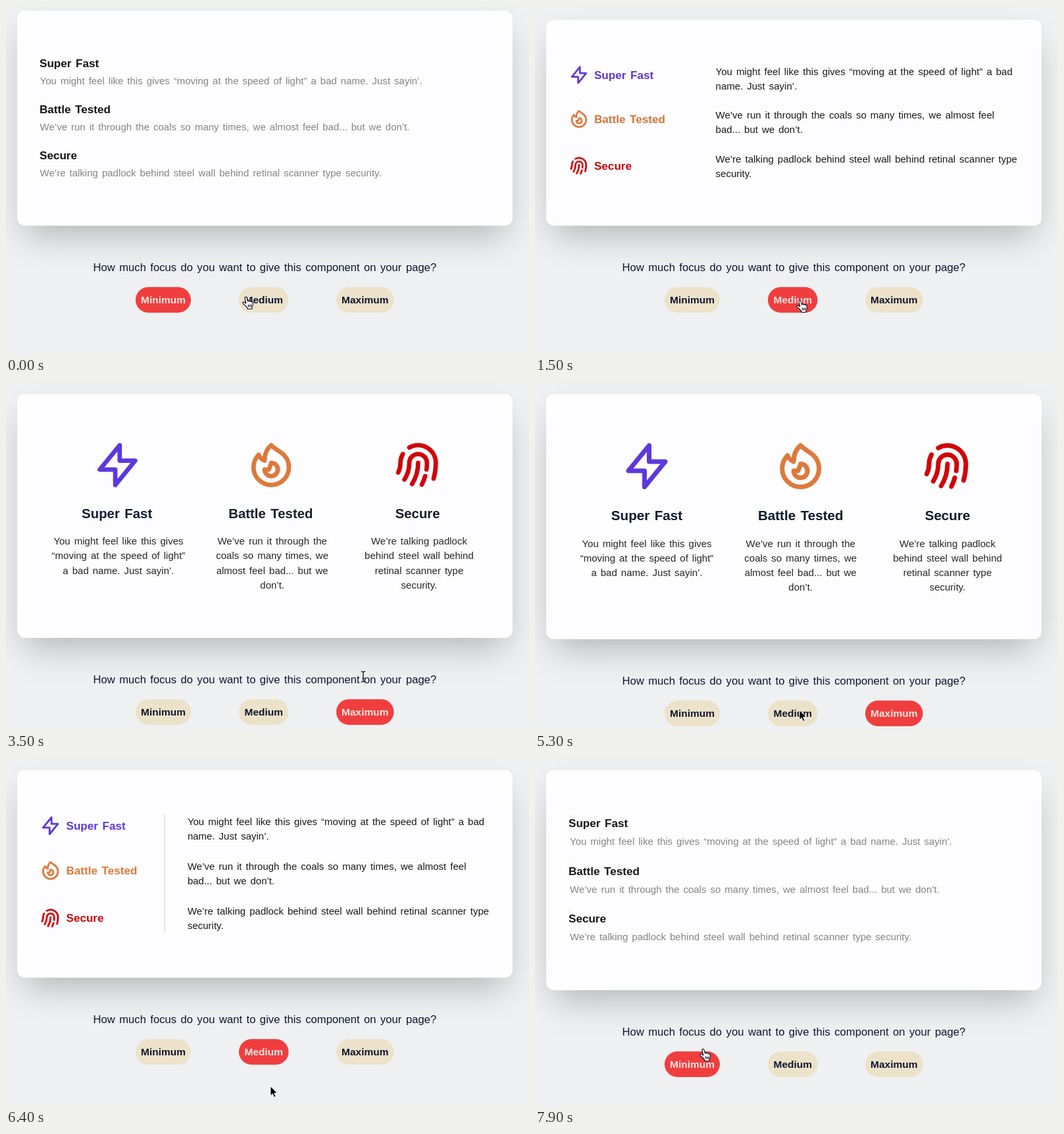
Write an HTML page that moves like this. It is 795 px wide and 529 px high and loops after 8 s.

```html
<!DOCTYPE html>
<html lang="en">
<head>
<meta charset="utf-8">
<title>Component focus</title>
<style>
  html, body { margin: 0; width: 100%; height: 100%; overflow: hidden; background: #eef0f1; }
  #card {
    position: absolute; left: 17px; width: 752.5px; border-radius: 12px;
    background: #fdfcfe; box-shadow: 0 25px 50px -12px rgba(0, 4, 0, .26);
  }
  svg { position: absolute; left: 0; top: 0; }
  text { font: 15px "Liberation Sans", Arial, sans-serif; word-spacing: 1.85px; white-space: pre; }
  .title { font-weight: bold; }
  .icon { fill: none; stroke-width: 2; stroke-linecap: round; stroke-linejoin: round; }
  .question { font-size: 16.65px; fill: #0f1632; }
  .label { font-size: 15.5px; font-weight: bold; }
  .mid { text-anchor: middle; }
</style>
</head>
<body>
<div id="card"></div>
<svg id="stage" width="795" height="529">
  <path id="rule" stroke="#c3d5d9" fill="none"/>
  <g id="controls"><text class="question mid" x="393.3" y="403">How much focus do you want to give this component on your page?</text></g>
  <circle id="ring" r="32.5" fill="none" stroke="#0c0c18" stroke-width="1.5"/>
  <path id="cursor" stroke-linejoin="round"/>
</svg>
<script>
const LOOP = 8000, MORPH = 400;
const MIN = 0, MED = 1, MAX = 2;
const $ = id => document.getElementById(id);

// In copy, "|" breaks a line in the medium layout and "/" in the maximum one.
const items = [
  { name: 'Super Fast', color: '#5d38dc',
    copy: 'You might feel like this gives /“moving at the speed of light” /a bad |name. Just sayin’.',
    icon: 'M13 10V3L4 14h7v7l9-11h-7z' },
  { name: 'Battle Tested', color: '#de793c',
    copy: 'We’ve run it through the /coals so many times, we /almost feel |bad... but we /don’t.',
    icon: 'M17.657 18.657A8 8 0 0 1 6.343 7.343S7 9 9 10c0-2 .5-5 2.986-7C14 5 16.09 5.777 17.656 7.343A7.975 7.975 0 0 1 20 13a7.975 7.975 0 0 1-2.343 5.657zM9.879 16.121A3 3 0 1 0 12.015 11L11 14H9c0 .768.293 1.536.879 2.121z' },
  { name: 'Secure', color: '#d00409',
    copy: 'We’re talking padlock /behind steel wall behind /retinal scanner type |/security.',
    icon: 'M12 11c0 3.517-1.009 6.799-2.753 9.571m-3.44-2.04l.054-.09A13.916 13.916 0 0 0 8 11a4 4 0 1 1 8 0c0 1.017-.07 2.019-.203 3m-2.118 6.844A21.88 21.88 0 0 0 15.171 17m3.839 1.132c.645-2.266.99-4.659.99-7.132A8 8 0 0 0 8 4.07M3 15.364c.64-1.319 1-2.8 1-4.364 0-1.457.39-2.823 1.07-4' }
];
const buttons = [['Minimum', 197, 84], ['Medium', 354, 75.5], ['Maximum', 502, 87.5]];

const scenes = [
  { at: -LOOP, mode: MIN, from: MIN, top: () => 7 },
  { at: 1205, mode: MED, from: MIN, top: h => 334 - h },
  { at: 3225, mode: MAX, from: MED, top: () => 18 },
  { at: 5420, mode: MED, from: MAX, top: () => 18 },
  { at: 7600, mode: MIN, from: MED, top: () => 18 }
];
const clicks = [[1000, 1230], [3000, 3230], [5330, 5480], [7430, 7610]];

// Pointer moves: start, end, x, y
const moves = [[0, 0, 364, 443], [150, 650, 402, 448], [2250, 2850, 543, 448],
  [4150, 4950, 402, 499], [6750, 7300, 255, 443]];
const pointerTypes = [[0, 'hand'], [2450, 'arrow'], [2680, 'hand'], [3300, 'beam'], [4250, 'arrow'], [7080, 'hand']];
const pointers = {
  hand: { fill: '#fff', stroke: '#14142a', width: 1.2,
    d: 'M-1 1.2C-1.4-.8 1.2-1.4 2 .6L3.6 6C4 4.8 6 4.8 6.4 6.2 7 5.2 8.8 5.4 9 6.8 9.8 6 11.4 6.6 11.4 8.2 11.6 11.4 11 13 10 15V17.5H3.2L2.6 15.5C1 13.6-.6 11.6-3.6 9.4-5 8-3.6 6.4-2 7.2L.8 9ZM4.4 10.8V14.4M6.5 10.8V14.4M8.6 10.8V14.4' },
  arrow: { fill: '#000', stroke: '#fff', width: .9, d: 'M0 0V14.5L3.3 11.4 5.6 16.8 8 15.8 5.7 10.5H10.3Z' },
  beam: { fill: 'none', stroke: '#111', width: 1.3,
    d: 'M-3.2-8Q-.6-8 0-6.4.6-8 3.2-8M0-6.4V6.4M-3.2 8Q-.6 8 0 6.4.6 8 3.2 8M-1.6 2.5H1.6' }
};

// Card heights and item places; r is the share of the morph still to go.
const heights = [
  r => 327 + 190 * r,
  (r, from) => 316 + r * (from === MAX ? 100 : -62),
  r => 373 - 32 * r
];
const poses = [
  (i, r) => {
    const y = 86 + 70 * i + (34 + 62 * i) * r;
    return { size: 34 * r, icon: [52 + 17 * r, 68 + (70 + 62 * r) * i + 17 * r],
      title: [51, y], font: 17.1, copy: [51.6 + 35 * r, y + 26 + 28 * r] };
  },
  (i, r, from) => {
    const big = from === MAX, grow = (big ? 50 : -34) * r;
    const y = 85 + [0, 68, 140.5][i] + r * (big ? 25 + 40 * i : -20 - 26 * i);
    return { size: 34 + grow, icon: [67.7 + grow / 2, y], title: [91.5 + grow, y + 5.8],
      font: 17.1 + (big ? 3.5 * r : 0),
      copy: [275.9 - 30 * r, 84.3 + i * (67.6 + r * (big ? 40 : -31))] };
  },
  (i, r) => {
    const x = [170, 403.7, 627][i], size = 84 - 50 * r;
    return { size, icon: [x - 8 * r, 68 + size / 2], title: [x - 20 * r, 192.2 - 54 * r],
      font: 20.6 - 3.5 * r, copy: [x + 14 * r, 232.5 - 48 * r] };
  }
];
const titleColor = (mode, item) => ['#141315', item.color, '#0c1a2a'][mode];
const copyColor = ['#858387', '#19181b', '#262528'];
const mix = (from, to, r) => `color-mix(in srgb, ${from} ${r * 100}%, ${to})`;

function add(parent, tag, attrs, content = '') {
  const el = document.createElementNS('http://www.w3.org/2000/svg', tag);
  set(el, attrs);
  el.textContent = content;
  return parent.appendChild(el);
}
function set(el, attrs) {
  for (const key in attrs) el.setAttribute(key, attrs[key]);
}
const place = (el, [x, y], top = 0) => el.setAttribute('transform', `translate(${x} ${y + top})`);

function splitCopy(copy, mode) {
  if (mode === MIN) return [copy.replace(/[|/]/g, '')];
  return mode === MED ? copy.replace(/\//g, '').split('|') : copy.replace(/\|/g, '').split('/');
}

for (const item of items) {
  const group = add($('stage'), 'g', {});
  $('stage').insertBefore(group, $('controls'));
  item.iconEl = add(group, 'path', { class: 'icon', d: item.icon, stroke: item.color });
  item.titleEl = add(group, 'text', { class: 'title' }, item.name);
  item.copyEls = [MIN, MED, MAX].map(mode => {
    const text = add(group, 'text', mode === MAX ? { class: 'mid' } : {});
    text.style.fill = copyColor[mode];
    splitCopy(item.copy, mode).forEach((line, n) => add(text, 'tspan', { x: 0, y: n * 22.2 }, line.trim()));
    return text;
  });
}
const buttonEls = buttons.map(([name, x, width]) => [
  add($('controls'), 'rect', { x, y: 427.3, width, height: 39, rx: 19.5 }),
  add($('controls'), 'text', { class: 'label mid', x: x + width / 2, y: 452 }, name)
]);

function drawPointer(t) {
  let x = 0, y = 0;
  for (const [start, end, toX, toY] of moves) {
    if (t < start) break;
    const p = end > start ? Math.min(1, (t - start) / (end - start)) : 1;
    const e = p * p * (3 - 2 * p);
    x += (toX - x) * e;
    y += (toY - y) * e;
  }
  const look = pointers[pointerTypes.findLast(([at]) => t >= at)[1]];
  set($('cursor'), { d: look.d, fill: look.fill, stroke: look.stroke, 'stroke-width': look.width });
  place($('cursor'), [x, y]);
  place($('ring'), [x, y]);
  $('ring').style.opacity = clicks.some(([on, off]) => t >= on && t < off) ? 1 : 0;
}

function draw(t) {
  const { at, mode, from, top: topFor } = scenes.findLast(s => t >= s.at);
  const r = Math.max(0, 1 - (t - at) / MORPH) ** 2.3;
  const height = heights[mode](r, from), top = topFor(height);
  $('card').style.top = top + 'px';
  $('card').style.height = height + 'px';

  items.forEach((item, i) => {
    const pose = poses[mode](i, r, from), scale = pose.size / 24;
    const [x, y] = pose.icon;
    item.iconEl.setAttribute('transform', `translate(${x} ${y + top}) scale(${scale}) translate(-12 -12)`);
    item.iconEl.style.display = scale > 0 ? '' : 'none';
    place(item.titleEl, pose.title, top);
    item.titleEl.style.fontSize = pose.font + 'px';
    item.titleEl.style.textAnchor = mode === MAX ? 'middle' : 'start';
    item.titleEl.style.fill = mix(titleColor(from, item), titleColor(mode, item), r);
    item.copyEls.forEach((el, m) => { el.style.display = m === mode ? '' : 'none'; });
    place(item.copyEls[mode], pose.copy, top);
  });

  $('rule').setAttribute('d', `M241 ${top + 68}V${top + height - 69}`);
  $('rule').style.opacity = mode === MED ? Math.min(1, Math.max(0, (t - at - 300) / 250)) : 0;

  place($('controls'), [0, top + height - 334]);
  buttonEls.forEach(([pill, label], i) => {
    pill.style.fill = i === mode ? '#f03e3f' : '#ece2c9';
    label.style.fill = i === mode ? '#fbe9e4' : '#11162f';
  });
  drawPointer(t);
}

function frame() {
  draw(performance.now() % LOOP);
  requestAnimationFrame(frame);
}
frame();
</script>
</body>
</html>
```
